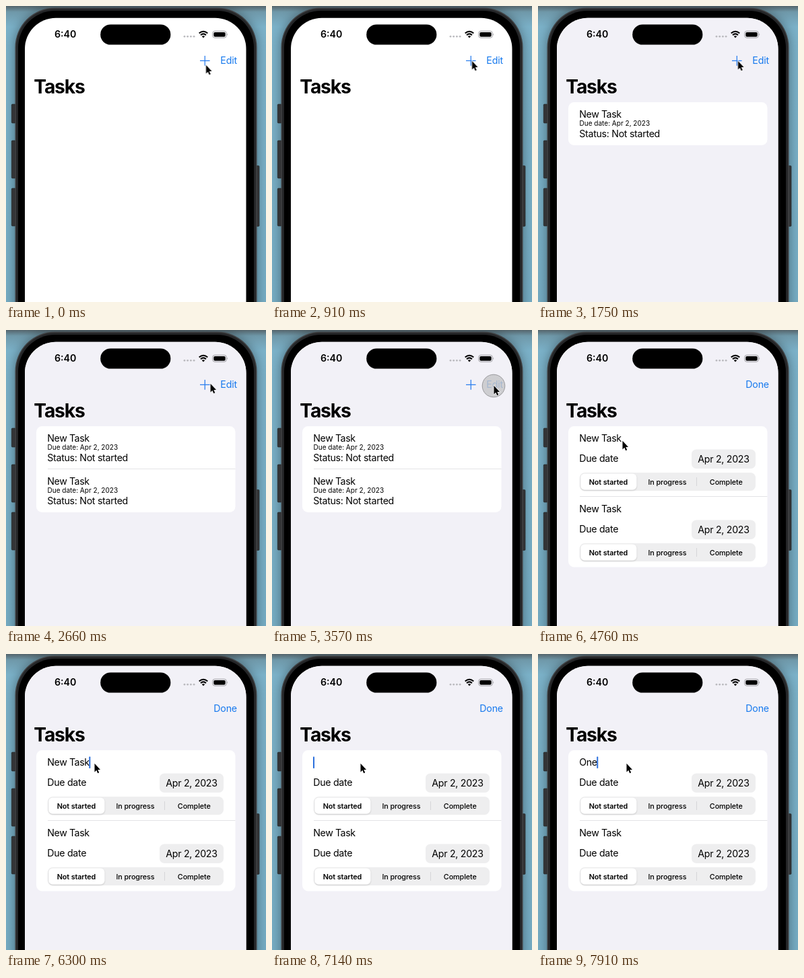
Animation of 386 by 440 pixels, one loop 8 s. Source, as an HTML page:

```html
<!DOCTYPE html>
<html lang="en">
<head>
<meta charset="utf-8">
<title>Task list</title>
<style>
  html, body { margin: 0; width: 100%; height: 100%; overflow: hidden; background: #78afc5; }
  svg { display: block; width: 386px; height: 440px; }
  text {
    font: 14.2px Inter, Roboto, sans-serif;
    font-optical-sizing: none;
    letter-spacing: -.3px;
    fill: #000;
    white-space: pre;
  }
  .clock { font-weight: 600; letter-spacing: 0; }
  .title { font-size: 28.2px; font-weight: 700; letter-spacing: -1.15px; }
  .name { letter-spacing: -.42px; }
  .link { fill: #1679ee; letter-spacing: -.15px; text-anchor: end; }
  .small { font-size: 10.04px; letter-spacing: 0; }
  .date { text-anchor: middle; }
  .segment { font-size: 10.8px; font-weight: 500; letter-spacing: -.1px; text-anchor: middle; }
  .picked { font-weight: 600; }
  .rule { stroke: #e3e3e6; stroke-width: 1; }

  .list, .second, .card, .summary, .editor, .touch, .cursor { animation: 8s linear infinite; }
  .list { animation-name: list; }
  .second { animation-name: second; }
  .card { animation-name: grow; animation-timing-function: ease-in-out; }
  .summary { animation-name: leave; }
  .editor { animation-name: enter; }
  .touch { animation-name: touch; }
  .cursor { animation-name: move; }

  @keyframes list { 0%, 16.6% { opacity: 0 } 20.1%, 100% { opacity: 1 } }
  @keyframes second {
    0%, 29.1% { opacity: 0; transform: translateY(-20px) }
    32.4%, 100% { opacity: 1; transform: none }
  }
  @keyframes grow {
    0%, 29.1% { height: 64px }
    32.4%, 45.5% { height: 128px }
    49.5%, 100% { height: 209.5px }
  }
  @keyframes leave { 0%, 45.5% { opacity: 1 } 49%, 100% { opacity: 0 } }
  @keyframes enter { 0%, 45.5% { opacity: 0 } 49.5%, 100% { opacity: 1 } }
  @keyframes touch {
    0%, 14% { opacity: 0 } 14.9%, 16.6% { opacity: 1 } 19.25%, 27.1% { opacity: 0 }
    28%, 29.1% { opacity: 1 } 31.5%, 42.8% { opacity: 0 }
    43.7%, 45% { opacity: 1 } 47.5%, 70.9% { opacity: 0 }
    71.7%, 73.5% { opacity: 1 } 76%, 100% { opacity: 0 }
  }
  @keyframes move {
    0%, 2.6% { transform: translate(296.5px, 87px) }
    8.75%, 32.3% { transform: translate(296.5px, 81px) }
    33.25% { transform: translate(303px, 79px) }
    36.75%, 50.75% { transform: translate(329px, 82px); animation-timing-function: ease-in-out }
    58.75%, 67.3% { transform: translate(125px, 164px) }
    70%, 100% { transform: translate(131px, 162px) }
  }
</style>
</head>
<body>
<svg viewBox="0 0 386 440">
  <defs>
    <linearGradient id="wall" x2="0" y2="1">
      <stop stop-color="#55656c"/>
      <stop offset=".02" stop-color="#6f98a9"/>
      <stop offset=".07" stop-color="#7bb1c8"/>
      <stop offset="1" stop-color="#76adc4"/>
    </linearGradient>
    <filter id="blur" x="-20%" y="-20%" width="140%" height="140%"><feGaussianBlur stdDeviation="8"/></filter>
    <filter id="lift" x="-10%" y="-20%" width="120%" height="150%">
      <feDropShadow dx="0" dy="1" stdDeviation="1.2" flood-opacity=".2"/>
    </filter>
    <clipPath id="glass"><rect x="28" y="17.7" width="328.5" height="520" rx="46"/></clipPath>
  </defs>

  <rect width="386" height="440" fill="url(#wall)"/>
  <rect x="13" y="3" width="360" height="540" rx="58" opacity=".36" filter="url(#blur)"/>

  <g fill="#333436" stroke="#1f2021" stroke-width=".6">
    <rect x="8.3" y="146" width="6" height="28" rx="1.2"/>
    <rect x="8.3" y="200" width="6" height="56" rx="1.2"/>
    <rect x="8.3" y="271" width="6" height="56" rx="1.2"/>
    <rect x="371" y="237.5" width="5" height="90" rx="1.2"/>
  </g>
  <rect x="13.5" y="2.5" width="359" height="540" rx="59" fill="#3f4042"/>
  <rect x="15" y="4" width="356" height="540" rx="57.5" fill="#252628"/>
  <rect x="18" y="7" width="350" height="540" rx="55"/>

  <g clip-path="url(#glass)">
    <rect x="28" y="17" width="329" height="423" fill="#fff"/>
    <g class="list">
      <rect x="28" y="17" width="329" height="423" fill="#f2f1f7"/>
      <rect class="card" x="45" y="143" width="295.5" height="64" rx="8.5" fill="#fff"/>
      <g class="summary" id="summary"></g>
      <g class="editor" id="editor"></g>
    </g>
  </g>

  <rect x="140.2" y="27.4" width="104.2" height="30.2" rx="15.1"/>
  <text class="clock" x="72" y="47.3">6:40</text>
  <g fill="#b9b9bd">
    <circle cx="265" cy="45.3" r="1.4"/><circle cx="269.7" cy="45.3" r="1.4"/>
    <circle cx="274.4" cy="45.3" r="1.4"/><circle cx="279.1" cy="45.3" r="1.4"/>
  </g>
  <g fill="none" stroke="#000" stroke-width="2">
    <path d="M286.7 40.6Q293 34.8 299.3 40.6M289 43.2Q293 39.6 297 43.2"/>
    <path d="M293 47.6L290.7 45.1Q293 43.2 295.3 45.1Z" fill="#000" stroke="none"/>
  </g>
  <rect x="306.7" y="37.3" width="20.6" height="10" rx="3.2" fill="none" stroke="#a0a0a4"/>
  <rect x="308.3" y="38.9" width="17.4" height="6.8" rx="1.9"/>
  <path d="M328.4 40.6Q330.2 42.3 328.4 44Z" fill="#a0a0a4"/>

  <text class="title" x="41.3" y="129.9">Tasks</text>
  <g class="summary">
    <path d="M288 81.4H302.6M295.3 74.1V88.7" stroke="#2a7eee" stroke-width="1.25"/>
    <text class="link" x="343" y="86.3">Edit</text>
  </g>
  <g class="editor"><text class="link" x="343" y="86.3">Done</text></g>

  <g class="cursor">
    <circle class="touch" cy="1" r="16.8" fill="#c6c6c8" fill-opacity=".82" stroke="#97979a"/>
    <path d="M.5 .8V13.4L3.3 10.8 5.2 15.2 7.2 14.3 5.3 9.9H9Z" stroke="#fff" stroke-width="1.2" paint-order="stroke"/>
  </g>
</svg>

<script>
  const LOOP = 8000;
  const byId = id => document.getElementById(id);
  const at = (y, content, cls = '') => `<g transform="translate(0 ${y})"><g class="${cls}">${content}</g></g>`;

  const summaryRow = `
    <text class="name" x="61.3" y="165.7">New Task</text>
    <text class="small" x="61.5" y="178.4">Due date: Apr 2, 2023</text>
    <text x="61.3" y="194.7">Status: Not started</text>`;

  const editorRow = `
    <text class="name" x="61.3" y="166.2">New Task</text>
    <text x="61.3" y="196.4">Due date</text>
    <rect x="228" y="177.5" width="95" height="28.5" rx="7" fill="#eeeeef"/>
    <text class="date" x="275.5" y="196.8">Apr 2, 2023</text>
    <rect x="62" y="212" width="261" height="27" rx="7.5" fill="#eeeeef"/>
    <rect x="63.3" y="213.5" width="83" height="24" rx="6" fill="#fff" filter="url(#lift)"/>
    <path d="M235.5 219V232" stroke="#d5d5d8"/>
    <text class="segment picked" x="104.5" y="229.8">Not started</text>
    <text class="segment" x="192" y="229.8">In progress</text>
    <text class="segment" x="279.3" y="229.8">Complete</text>`;

  const rule = y => `<path class="rule" d="M62 ${y}H340.5"/>`;

  byId('summary').innerHTML = at(0, summaryRow) + at(64, summaryRow + rule(142.5), 'second');
  byId('editor').innerHTML = at(0, editorRow) + at(105, editorRow) + rule(247.5) +
    '<rect id="caret" y="152.5" width="2" height="17.5" rx=".8" fill="#2b6fdd"/>';

  const name = document.querySelector('#editor .name');
  const caret = byId('caret');
  const typing = [[7210, 'O'], [7560, 'On'], [7770, 'One']];

  function nameAt(t) {
    const typed = typing.filter(([start]) => t >= start).pop();
    if (typed) return typed[1];
    if (t >= 6930) return '';
    const erased = Math.floor((t - 6370) / 70) + 1;
    return 'New Task'.slice(0, 8 - Math.min(7, Math.max(0, erased)));
  }

  function draw() {
    const t = performance.now() % LOOP;
    const value = nameAt(t);
    if (name.textContent !== value) name.textContent = value;
    caret.setAttribute('x', 61 + (value ? name.getComputedTextLength() : 0));
    caret.setAttribute('visibility', t >= 5950 ? 'visible' : 'hidden');
    requestAnimationFrame(draw);
  }
  draw();
</script>
</body>
</html>
```
